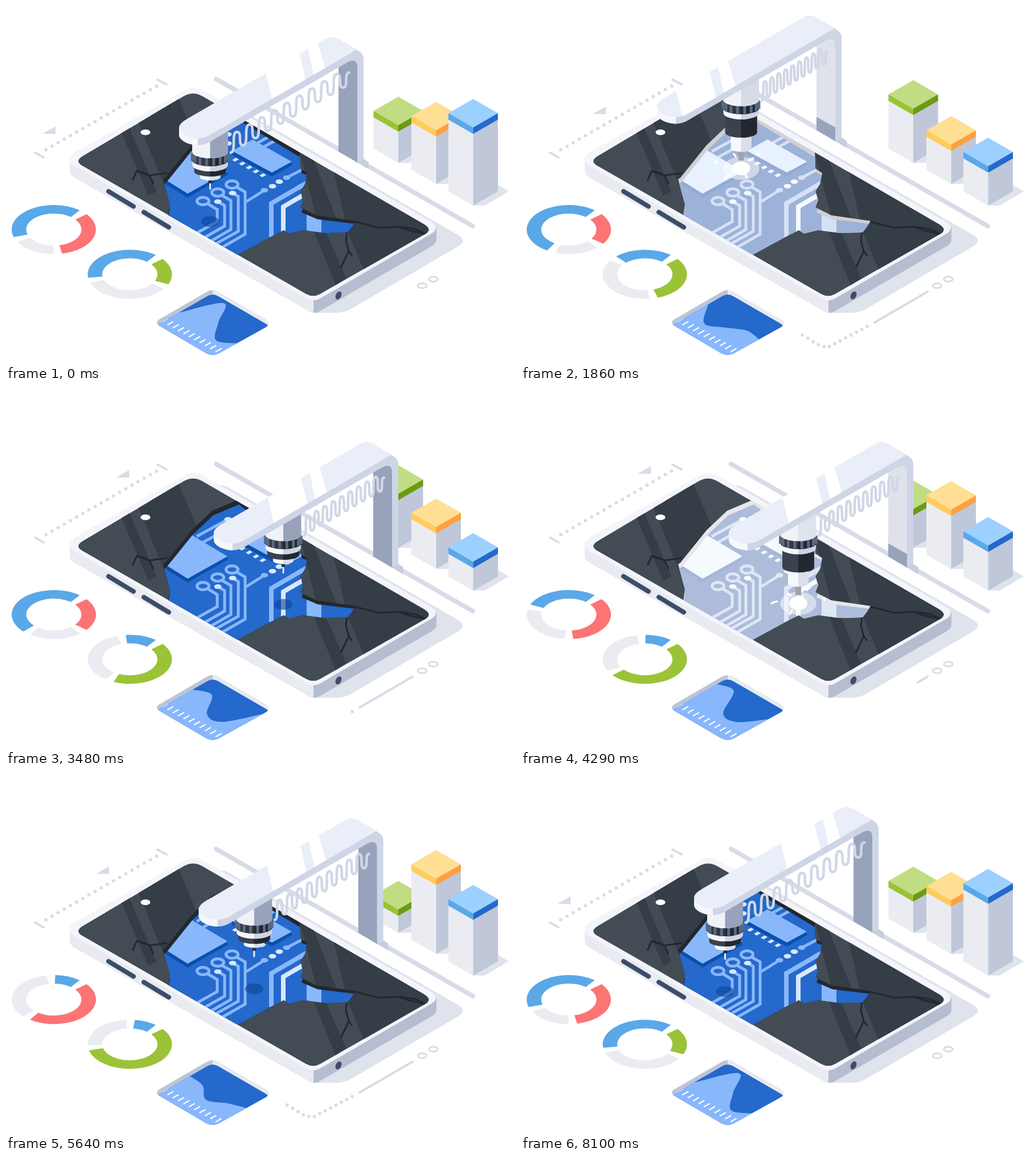
An HTML page that plays this animation: 894 by 626 pixels, repeating every 8130 ms.

```html
<!DOCTYPE html>
<html lang="en">
<head>
<meta charset="utf-8">
<title>Phone repair</title>
<style>
  html, body { margin: 0; width: 100%; height: 100%; overflow: hidden; background: #fff; }
  svg { display: block; width: 100%; height: 100%; }
  .line { fill: none; stroke: #d8dce8; stroke-linecap: round; stroke-width: 4; }
  .trace { fill: none; stroke: var(--trace); stroke-width: 5; }
  .crack { fill: none; stroke: #23272f; stroke-width: 3; stroke-linejoin: round; }
</style>
</head>
<body>
<svg id="stage" viewBox="0 0 894 626">
  <defs>
    <clipPath id="screenClip"><path id="screenShape" d="M135.500 262.500L312 158Q328.500 148.500 345 158L734 382.500Q750 392 736 400L552 505Q539.500 512 527 505L133.500 280Q119.500 271.700 135.500 262.500Z"/></clipPath>
    <clipPath id="holeClip"><path d="M276 304L280 301L326 244L362 210L407 191L425 200L516 254L517 285L529 293L525 312L517 325L522 340L517 353L545 367L614 377L607 388L600 397L560 398L522 393L497 399L488 393L470 402L400 440L284 374L288 348L282 326Z"/></clipPath>
    <clipPath id="boardClip"><path transform="translate(2 8)" d="M276 304L280 301L326 244L362 210L407 191L419 200L516 258L517 285L540 293L540 312L517 325L522 340L517 354L545 366L620 375L600 420L400 440L280 376L286 348L280 326Z"/></clipPath>
    <clipPath id="armClip"><path id="armTop" d="M318 198L562 57Q572 51 582 57L615 77L355 228Q337 236 320 229C311 225 304 220 304 213Q304 206 318 198Z"/></clipPath>
    <clipPath id="tileClip"><path d="M270 549L353 501Q363 495 373 501L456 549Q467 556 457 563L374 609Q363 615 352 609L270 561Q260 555 270 549Z"/></clipPath>
    <clipPath id="tileInner"><path transform="translate(0 8)" d="M270 549L353 501Q363 495 373 501L456 549Q467 556 457 563L374 620H353L270 561Q260 555 270 549Z"/></clipPath>
  </defs>

  <g id="ruler">
    <path class="line" d="M51 257L66 265.500M266 129L282 137.500"/>
    <path id="pointer" d="M64 224L87 211V224.500Z" fill="#d8dce8"/>
  </g>
  <path class="line" d="M369 128L820 386" style="stroke-width:8"/>
  <path d="M370 167Q380 163 392 170L795 402Q810 411 795 421L608 530Q595 538 580 538H540L500 400Z" fill="#dfe3ec"/>

  <g id="phone">
    <path d="M112 268V290Q112 296 120 301L528 533Q534 538 540 538V510Z" fill="#e9ebf1"/>
    <path d="M540 510V538Q547 538 553 534L748 421Q756 416 756 410V388Z" fill="#b5bdd0"/>
    <path d="M120 257L312 149Q329 139 346 148L746 378Q764 389 746 400L553 512Q540 520 527 512L120 280Q102 269 120 257Z" fill="#f3f5fa"/>
    <path d="M180 325L224 351.500M242 361.500L286 388" stroke="#3d4d68" stroke-width="8" stroke-linecap="round"/>
    <ellipse cx="584" cy="507.500" rx="4.800" ry="7.500" transform="rotate(25 584 507.500)" fill="#3d4d68"/>
    <g clip-path="url(#screenClip)">
      <use href="#screenShape" fill="#434c55"/>
      <g fill="#353d46">
        <path d="M203 222L217 214L264 325L250 333Z"/>
        <path d="M232 203L303 162L345 262L280 320Z"/>
        <path d="M516 255L540 268L580 372L545 371Z"/>
        <path d="M575 288L760 392L628 462L600 395Z"/>
        <path d="M541 396L562 396L597 477L579 490Z"/>
      </g>
      <ellipse cx="245" cy="221.500" rx="8.500" ry="5" fill="#fff"/>
      <path class="crack" d="M229 289L252 297L283 293M222 306L230 289L246 294M252 297L259 312"/>
      <path class="crack" d="M612 378L656 389L690 387L706 393L737 400M690 387L718 391L734 398M599 395L597 411L602 430L588 459M601 428L608 438"/>
      <g clip-path="url(#holeClip)">
        <path d="M260 180H630V450H260Z" fill="var(--edge)"/>
        <g clip-path="url(#boardClip)" id="board">
          <path d="M260 180H630V450H260Z" fill="var(--board)"/>
          <path class="trace" d="M335 255L390 225M345 266L390 241M445 251L473 236M435 244L460 230"/>
          <path d="M280 304L319 329L389 290V296L319 336L280 312Z" fill="var(--side)"/>
          <path d="M322 250L389 290L319 329L279 304Z" fill="var(--chip)"/>
          <path d="M397 254L467 292L502 273V279L467 299L397 261Z" fill="var(--side)"/>
          <path d="M433 234L502 273L467 292L397 254Z" fill="var(--chip)"/>
          <path class="trace" d="M353 346L371 357V378L330 401M372 343L384 350V386L345 408M379 332L395 341V392L355 415M398 328L408 334V395L365 419M404 317L420 326V400L378 424M422 343L454 323M493 301L530 282"/>
          <path class="trace" d="M466 405V346L530 309" style="stroke-width:8"/>
          <path class="trace" d="M487 400V352L525 330" style="stroke-width:8;stroke:var(--dot)"/>
          <path d="M528 360H554V400H528Z" fill="var(--trace)"/>
        </g>
        <ellipse id="spot" rx="16" ry="9.500" fill="#0f4396"/>
      </g>
    </g>
  </g>

  <g id="glow" fill="#fff">
    <ellipse rx="32" ry="20" opacity=".5"/>
    <ellipse rx="16" ry="12"/>
    <path id="sparks" fill="none" stroke="#fff" stroke-width="3.500" stroke-linecap="round"/>
  </g>

  <g id="bars"></g>

  <g id="post">
    <path d="M617 274L628 268L637 274V286L628 281Z" fill="#c6cddd"/>
    <path d="M584 106L606 94Q618 90 618 106V275L584 255Z" fill="#98a2bb"/>
    <path id="postLight" d="M584 106L606 94Q618 90 618 106V251L584 232Z" fill="#dfe2ea"/>
  </g>
  <path id="spring" fill="none" stroke="#d0d7e6" stroke-width="4.500" stroke-linecap="round"/>
  <g id="head">
    <g id="tool"></g>
    <g id="sleeve"></g>
    <g id="collar"></g>
  </g>
  <g id="arm">
    <path d="M304 211V226C304 236 322 244 337 244C347 244 356 240 364 234.500L600 98.500Q617 90 617 108V274L628 268V92Q628 84 618 78L582 57L318 200Z" fill="#cdd5e6"/>
    <path d="M304 211V226C304 236 322 244 337 244V225Z" fill="#f5f7fb"/>
    <use href="#armTop" fill="#e9eef8"/>
    <g clip-path="url(#armClip)">
      <path id="glint" d="M456 116L515 82L527 132L468 167ZM530 74L547 63L562 113L541 126Z" fill="#fff"/>
    </g>
  </g>

  <g id="donuts"></g>

  <g clip-path="url(#tileClip)">
    <path d="M255 490H363V620H255Z" fill="#bcc5d6"/>
    <path d="M363 490H470V620H363Z" fill="#e8eaf0"/>
    <g clip-path="url(#tileInner)">
      <path d="M255 490H470V620H255Z" fill="#2469cb"/>
      <path id="wave" fill="#88b7fc"/>
      <path id="ticks" stroke="#fff" stroke-width="2.200"/>
    </g>
  </g>

  <g id="callout">
    <ellipse class="line" cx="731" cy="490.500" rx="7.800" ry="4.300" style="stroke-width:3"/>
    <ellipse class="line" cx="750.500" cy="479" rx="7.800" ry="4.300" style="stroke-width:3"/>
    <path id="rule" class="line"/>
  </g>
</svg>

<script>
const LOOP = 8130, ISO = 0.577;
const TIMES = [0, 1860, 2820, 4290, 5640, 7050, LOOP];
const $ = id => document.getElementById(id);
const clamp = x => Math.min(1, Math.max(0, x));
const ease = x => (x = clamp(x)) < 0.5 ? 4 * x ** 3 : 1 - 4 * (1 - x) ** 3;
const range = n => [...Array(n).keys()];

function add(parent, tag, attrs) {
  const el = document.createElementNS('http://www.w3.org/2000/svg', tag);
  for (const name in attrs) el.setAttribute(name, attrs[name]);
  return $(parent).appendChild(el);
}
const path = (parent, d, fill) => add(parent, 'path', { d, fill });
const dot = (parent, cx, cy, rx, ry, fill) => add(parent, 'ellipse', { cx, cy, rx, ry, fill });
const set = (id, name, value) => $(id).setAttribute(name, value);
const move = (id, x, y) => set(id, 'transform', `translate(${x} ${y})`);

// Smooth monotone interpolation that rests at the loop seam.
function keyed(values, t) {
  const v = [...values, values[0]], last = TIMES.length - 1;
  const slope = i => (v[i + 1] - v[i]) / (TIMES[i + 1] - TIMES[i]);
  const tangent = i => {
    if (i === 0 || i === last) return 0;
    const a = slope(i - 1), b = slope(i);
    return a * b <= 0 ? 0 : 2 * a * b / (a + b);
  };
  let i = 0;
  while (i < last - 1 && TIMES[i + 1] <= t) i++;
  const h = TIMES[i + 1] - TIMES[i], s = (t - TIMES[i]) / h;
  return v[i] + (v[i + 1] - v[i]) * s * s * (3 - 2 * s)
    + h * s * (1 - s) * (tangent(i) * (1 - s) - tangent(i + 1) * s);
}

function linear(keys, t) {
  const i = keys.findIndex(k => k[0] > t);
  if (i < 0) return keys[keys.length - 1][1];
  const [t0, a] = keys[i - 1], [t1, b] = keys[i];
  return a + (b - a) * (t - t0) / (t1 - t0);
}

// Poses: rest, then three eased travels of 800 ms.
const travel = (starts, poses, t) => starts.reduce(
  (v, start, i) => v + (poses[(i + 1) % 3] - poses[i]) * ease((t - start) / 800), poses[0]);

const ARRIVALS = [860, 3400, 6060];
const sum = f => ARRIVALS.reduce((total, a) => total + f(a), 0);

function mix(from, to, k) {
  const part = (c, i) => parseInt(c.slice(i, i + 2), 16);
  return `rgb(${[1, 3, 5].map(i => Math.round(part(from, i) + (part(to, i) - part(from, i)) * k))})`;
}
const TINTS = {
  board: ['#2469cb', '#adbcda'], chip: ['#88b7fc', '#f5faff'], trace: ['#88b7fc', '#dfe7f5'],
  dot: ['#d9e8ff', '#f9fbff'], side: ['#0b4fae', '#a5b6d7'], edge: ['#23272f', '#e6e7e8'],
  shade: ['#98a2bb', '#dfe3ed']
};

// Static details
range(19).forEach(i => dot('ruler', 70 + 10.8 * i, 252 - 6.2 * i, 2.9, 2.9, '#d8dce8'));
set('ticks', 'd', range(11).map(i => `M${274 + 9.4 * i} ${554 + 5.25 * i}l10.500 -6`).join(''));
[[346, 342], [372, 327], [397, 313]].forEach(([cx, cy]) => add('board', 'ellipse',
  { cx, cy, rx: 10.5, ry: 6.5, class: 'trace' }));
[[372, 343, 'dot'], [398, 328, 'dot'], [454, 323, 'trace'], [468, 316, 'dot'], [480, 308, 'dot'],
 [493, 301, 'trace'], [390, 225, 'dot'], [390, 241, 'dot']].forEach(([x, y, tint]) =>
  dot('board', x, y, 6.5, 4, `var(--${tint})`));
range(5).forEach(i => path('board', `M${397 + 12 * i} ${270 + 6.8 * i}l7 -4l5 3l-7 4z`, 'var(--dot)'));

function cylinder(parent, r, top, bottom, ry, left, right) {
  path(parent, `M${-r} ${top}V${bottom}A${r} ${ry} 0 0 0 ${r} ${bottom}V${top}Z`, left);
  path(parent, `M0 ${top}V${bottom + ry}A${r} ${ry} 0 0 0 ${r} ${bottom}V${top}Z`, right);
}
add('tool', 'path', { d: 'M0 -32V-15', stroke: '#e6ebf5', 'stroke-width': 3 });
path('tool', 'M-3 -34H3V-26H-3Z', '#2b303a');
const beam = path('tool', 'M-5 -34H5V-16H-5Z', '#a0a3a8');
cylinder('tool', 18, -80, -37, 6, '#f7f9fc', '#d9dfeb');
cylinder('sleeve', 28, -110, -65, 9, '#3b424d', '#23272f');
cylinder('collar', 31, -122, -99, 11, '#f4f6fb', '#cdd5e6');
cylinder('collar', 32, -122, -108, 11, '#323842', '#23272f');
range(8).forEach(i => {
  const x = -32 * Math.cos((i + 0.5) * Math.PI / 8), y = 11 * Math.sqrt(1 - (x / 32) ** 2);
  add('collar', 'path', { d: `M${x} ${y - 122}V${y - 108.5}`, stroke: '#5a6a81', 'stroke-width': 5 });
});
cylinder('collar', 31.5, -180, -122, 11, '#f0f2f8', 'var(--shade)');

// Bars
const BARS = [
  { x: 689, base: 275, apex: [159, 130, 117, 157, 184, 167], colors: ['#c1dc82', '#9ac337', '#6c9a12'] },
  { x: 755.5, base: 312, apex: [168, 193, 204, 158, 130, 157], colors: ['#ffdf94', '#ffcc5c', '#ff9f40'] },
  { x: 820.5, base: 350, apex: [163, 231, 263, 221, 191, 171], colors: ['#9cd0ff', '#5aa8e8', '#2469cb'] }
];
BARS.forEach(bar => {
  const { x, base, colors } = bar;
  path('bars', `M${x} ${base}h20l42.500 -25l-20 -12z`, '#dfe3ec');
  bar.parts = ['#ebecf1', '#bfc7d9', ...colors].map(fill => path('bars', '', fill));
});
function drawBar({ x, base, apex, parts }, t) {
  const y = keyed(apex, t), w = 43.5, h = 25, cap = 11.2;
  const side = (dir, top, bottom) => `M${x} ${top}V${bottom}l${dir * w} ${-h}V${top - h}Z`;
  const front = y + 2 * h;
  [side(-1, front, base), side(1, front, base),
   `M${x} ${y}l${w} ${h}l${-w} ${h}l${-w} ${-h}z`,
   side(-1, front, front + cap), side(1, front, front + cap)]
    .forEach((d, i) => parts[i].setAttribute('d', d));
}

// Ring charts
const DONUTS = [
  { x: 84, y: 392, color: '#fc7474', end: [78.5, 35, 16, 84, 124.5, 90], start: [162, 121, 103, 204, 272, 194] },
  { x: 217.5, y: 470.5, color: '#9ac337', end: [24, 72, 91, 140, 166, 71.5], start: [172, 227, 256, 271, 277, 197] }
];
DONUTS.forEach(d => d.parts = ['#5aa8e8', d.color, '#ebecf1'].map(fill => path('donuts', '', fill)));
function sector(x, y, from, to) {
  const at = (deg, rx, ry) => {
    const a = deg * Math.PI / 180;
    return `${x + rx * Math.cos(a)} ${y + ry * Math.sin(a)}`;
  };
  const large = +(to - from > 180);
  return `M${at(from, 74, 43)}A74 43 0 ${large} 1 ${at(to, 74, 43)}`
    + `L${at(to, 48.5, 28)}A48.500 28 0 ${large} 0 ${at(from, 48.5, 28)}Z`;
}
function drawDonut({ x, y, end, start, parts }, t) {
  const e = keyed(end, t), s = keyed(start, t);
  [[s, 308], [-39, e], [e + 12, s - 12]].forEach(([a, b], i) =>
    parts[i].setAttribute('d', sector(x, y, a, b)));
}

// Wave tile: heights at five evenly spaced stations
const HEIGHTS = [
  [0.42, 0.65, 0.53, 0.82, 0.6, 0.57], [0.95, 0.33, 0.57, 0.86, 0.57, 0.48],
  [0.6, 0.45, 0.38, 0.42, 0.38, 0.31], [0.31, 0.6, 0.42, 0.41, 0.52, 0.57],
  [0.46, 0.57, 1, 0.75, 0.62, 1]
];
function drawWave(t) {
  const at = (u, v) => [265 + 98 * (u + v), 561 + 57 * (u - v)];
  const p = HEIGHTS.map((h, i) => at(i / 4, keyed(h, t)));
  const near = i => p[Math.min(4, Math.max(0, i))];
  const handle = (i, sign) => p[i].map((c, k) => c + sign * (near(i + 1)[k] - near(i - 1)[k]) / 6);
  let d = `M${at(-0.2, -0.4)}L${at(-0.2, keyed(HEIGHTS[0], t))}L${p[0]}`;
  for (let i = 0; i < 4; i++) d += `C${handle(i, 1)} ${handle(i + 1, -1)} ${p[i + 1]}`;
  set('wave', 'd', `${d}L${at(1.3, keyed(HEIGHTS[4], t))}L${at(1.3, -0.4)}Z`);
}

// Callout line with trailing dots
const calloutDots = range(13).map(i => {
  const x = 608 - 9.5 * i;
  const y = i < 8 ? 562 + 5 * i : [597, 594, 588.5, 582.5, 577][i - 8];
  return dot('callout', x, y, 2.9, 2.9, '#d8dce8');
});
const REVEAL = [[0, 0], [60, 0], [1200, 245], [2345, 245], [4290, 20], [4460, 0], [5500, 245], [6010, 245], [8080, 0]];
function drawCallout(t) {
  const length = linear(REVEAL, t), k = Math.min(length, 107) / 107;
  set('rule', 'd', k > 0 ? `M714 501L${714 - 93 * k} ${501 + 54 * k}` : '');
  calloutDots.forEach((el, i) => el.setAttribute('visibility', length > 112 + 10.8 * i ? 'visible' : 'hidden'));
}

function drawSpring(x, y, endX) {
  const turns = 19, step = (endX - x) / turns;
  const level = i => y - ISO * i * step + (i % 2 ? -1 : 1) * (i === turns ? 5 : 15);
  let d = `M${x} ${level(0)}`;
  for (let i = 1; i <= turns; i++) {
    const px = x + i * step;
    d += `C${px} ${level(i - 1)} ${px - step} ${level(i)} ${px} ${level(i)}`;
  }
  set('spring', 'd', d);
}

function drawSparks(t) {
  set('sparks', 'd', range(6).map(i => {
    const turn = t / 420 + i * 0.37, phase = turn % 1;
    const a = i * 1.05 + 0.4 + Math.floor(turn);
    const at = (r, lift) => `${r * Math.cos(a)} ${r * Math.sin(a) * 0.6 - lift * phase}`;
    const r = 18 + 28 * phase, size = 12 * Math.sin(Math.PI * phase);
    return `M${at(r, 8)}Q${at(r + size / 2, 8)} ${at(r + size, 4)}`;
  }).join(''));
}

function drawMachine(t) {
  const slide = travel([60, 2580, 5260], [0, -65, 61], t);
  const reach = travel([60, 2580, 5280], [0, 93, 67.5], t);
  const shine = travel([60, 2580, 5260], [0, -119, -58], t);
  const down = sum(a => ease((t - a) / 400) - ease((t - a - 1480) / 280));
  const lit = sum(a => clamp((t - a - 380) / 100) - clamp((t - a - 1400) / 100));
  const glow = lit * (0.94 - 0.06 * Math.sin(t / 70));
  const x = 358.5 + slide + reach, y = 378 + ISO * (slide - reach);

  move('post', slide, ISO * slide);
  move('arm', slide, ISO * slide);
  move('glint', shine, -ISO * shine);
  move('head', x, y);
  move('tool', 0, -41 * (1 - down));
  move('sleeve', 0, -23 * (1 - down));
  move('spot', x, y);
  move('glow', x, y - 2);
  set('spot', 'opacity', 0.6 * (1 - lit));
  set('glow', 'opacity', lit);
  set('postLight', 'opacity', lit);
  beam.setAttribute('opacity', lit);
  drawSpring(x + 36, y - 136, 603 + slide);
  drawSparks(t);
  for (const name in TINTS) $('stage').style.setProperty('--' + name, mix(...TINTS[name], glow));
}

function draw(t) {
  drawMachine(t);
  BARS.forEach(bar => drawBar(bar, t));
  DONUTS.forEach(donut => drawDonut(donut, t));
  drawWave(t);
  drawCallout(t);
  const shift = keyed([0, 62, 111, 141, 94, 24], t);
  move('pointer', shift, -0.56 * shift);
}

const began = performance.now();
function tick() {
  draw((performance.now() - began) % LOOP);
  requestAnimationFrame(tick);
}
tick();
</script>
</body>
</html>
```
